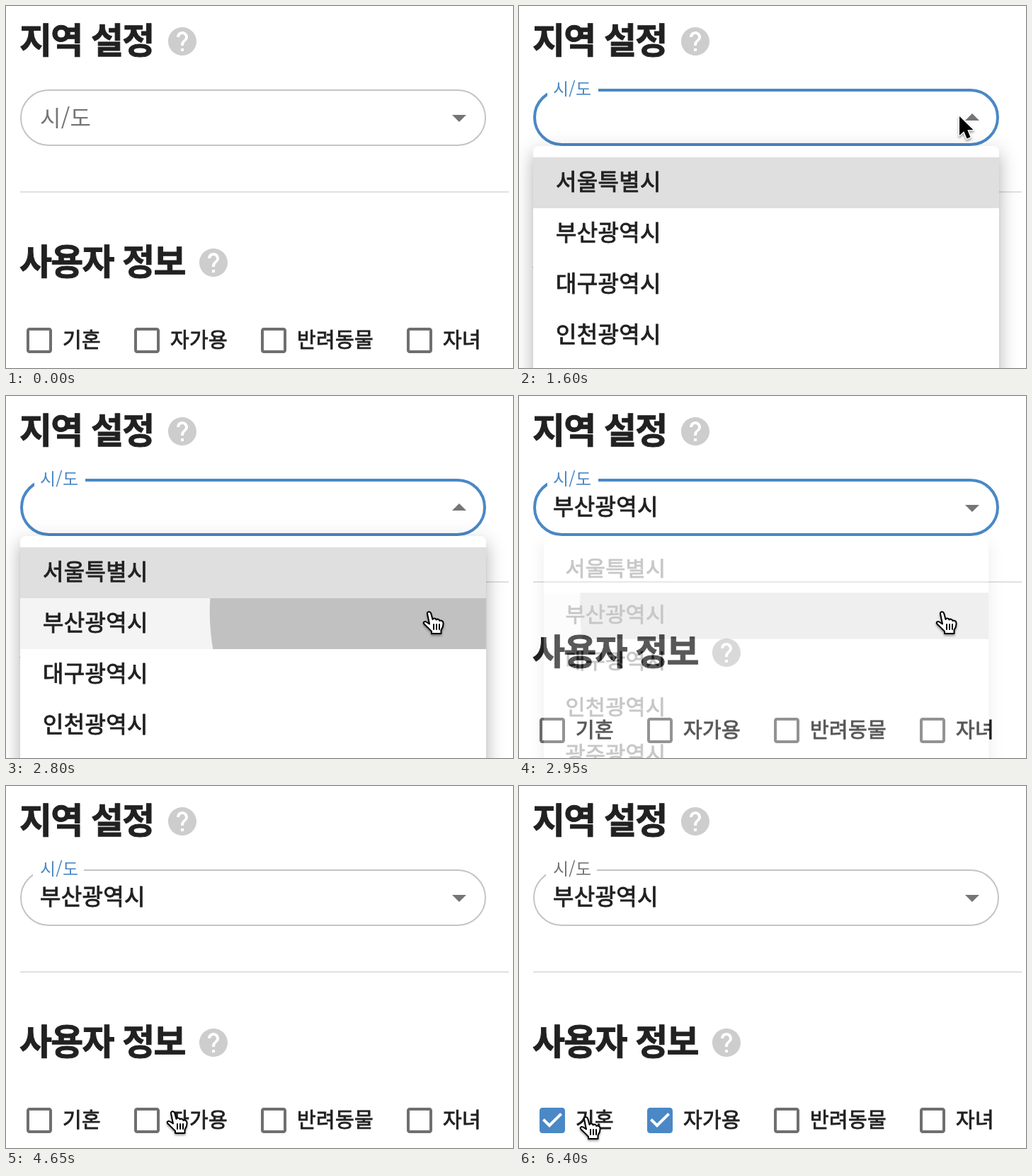
An HTML page that plays this animation: 716 by 512 pixels, repeating every 6.5 s.

```html
<!DOCTYPE html>
<html lang="ko">
<head>
<meta charset="utf-8">
<title>지역 설정</title>
<style>
html, body { margin: 0; width: 100%; height: 100%; overflow: hidden; background: #fff; }
svg { display: block; width: 716px; height: 512px; cursor: default; }
text {
  font: 500 32px "Noto Sans CJK KR", "Noto Sans KR", "Noto Sans CJK", sans-serif;
  fill: #212121; stroke: #212121; stroke-width: .9px; letter-spacing: .3px;
}
text.title { font-size: 50px; font-weight: 700; letter-spacing: -1.7px; }
text.option { font-size: 29px; }
#label { font-weight: 400; stroke: none; }
#cursor { filter: drop-shadow(0 2px 1.5px rgba(0, 0, 0, .4)); }
</style>
</head>
<body>
<svg viewBox="0 0 716 512">
  <defs>
    <path id="help" d="M12 2C6.48 2 2 6.48 2 12s4.48 10 10 10 10-4.48 10-10S17.52 2 12 2zm1 17h-2v-2h2v2zm2.07-7.75l-.9.92C13.45 12.9 13 13.5 13 15h-2v-.5c0-1.1.45-2.1 1.17-2.83l1.24-1.26c.37-.36.59-.86.59-1.41 0-1.1-.9-2-2-2s-2 .9-2 2H8c0-2.21 1.79-4 4-4s4 1.79 4 4c0 .88-.36 1.68-.93 2.25z"/>
    <filter id="blur5" x="-20%" width="140%"><feGaussianBlur stdDeviation="5"/></filter>
    <filter id="blur10" x="-20%" width="140%"><feGaussianBlur stdDeviation="10"/></filter>
    <filter id="blur14" x="-20%" width="140%"><feGaussianBlur stdDeviation="14"/></filter>
    <clipPath id="row"><rect x="20" y="286" width="658" height="72"/></clipPath>
  </defs>

  <text class="title" x="19" y="67">지역 설정</text>
  <use href="#help" transform="translate(225 26) scale(2)" fill="#cdcdcd"/>
  <rect id="border" fill="none"/>
  <rect id="notch" y="115" height="14" fill="#fff"/>
  <text id="label">시/도</text>
  <text id="value" x="48" y="168">부산광역시</text>
  <path id="arrow" fill="#757575"/>
  <rect x="20" y="262" width="690" height="2" fill="#e0e0e0"/>
  <text class="title" x="19" y="380">사용자 정보</text>
  <use href="#help" transform="translate(269 339) scale(2)" fill="#cdcdcd"/>
  <g id="options"></g>

  <g id="menu">
    <rect x="26" y="214" width="646" height="1288" opacity=".2" filter="url(#blur5)"/>
    <rect x="18" y="212" width="662" height="1304" rx="8" opacity=".14" filter="url(#blur10)"/>
    <rect x="16" y="200" width="666" height="1308" rx="8" opacity=".12" filter="url(#blur14)"/>
    <rect x="20" y="198" width="658" height="1300" rx="8" fill="#fff"/>
    <rect id="focused" x="20" y="214" width="658" height="72" opacity=".125"/>
    <rect id="hovered" x="20" y="286" width="658" height="72"/>
    <g clip-path="url(#row)"><circle id="ripple" cx="597" cy="305"/></g>
    <g id="items"></g>
  </g>

  <g id="cursor" stroke-linejoin="round">
    <path id="pointer" fill="#000" stroke="#fff" stroke-width="3" paint-order="stroke"
      d="M0 0V27L6.3 21.2 10.5 31.5 15.5 29.4 11.3 19.2H19.5Z"/>
    <g id="hand" transform="translate(-9 -1)" stroke="#000" stroke-width="2" stroke-linecap="round">
      <path fill="#fff" d="M7 4C6.5 1 11 0 12.2 3.5L14.5 12C15 10 19 10 19.5 12.5 20.5 11 24 11.5 24.3 14 26 13 29.5 14 29.5 17 30 22 28.5 24 26.5 27V32H13V29C10.5 26 6 22 2.5 18.5 .5 16 3 14 5.5 15.5L10 18.5Z"/>
      <path d="M16 19V26M20 19V26M24 19V26"/>
    </g>
  </g>
</svg>
<script>
const LOOP = 6500, STEP = 50, BLUE = [74, 136, 198], GREY = [117, 117, 117];
const OPEN = 1310, CLOSE = 2805, FADE = 300, PRESS = 2600, BLUR = 4650;

const $ = id => document.getElementById(id);
const set = (id, attrs) => { for (const k in attrs) $(id).setAttribute(k, attrs[k]); };
const show = (id, on) => set(id, { visibility: on ? 'visible' : 'hidden' });
const ramp = (t, start, length) => Math.min(1, Math.max(0, (t - start) / length));
const mix = (a, b, p) => a + (b - a) * p;
const rgb = (a, b, p) => `rgb(${a.map((v, i) => Math.round(mix(v, b[i], p)))})`;

// cubic-bezier(a, 0, .2, 1)
const bezier = a => x => {
  let lo = 0, hi = 1;
  for (let i = 0; i < 24; i++) {
    const s = (lo + hi) / 2, r = 1 - s;
    if (3 * a * s * r * r + .6 * s * s * r + s * s * s < x) lo = s; else hi = s;
  }
  return lo * lo * (3 - 2 * lo);
};
const inOut = bezier(.4), out = bezier(0);

// Cursor hot spot: time, x, y
const path = [
  [500, 740, 270], [550, 704, 240], [700, 654, 190], [800, 633, 168], [900, 622, 156],
  [1850, 622, 156], [2000, 617, 176], [2350, 602, 278], [2550, 597, 305],
  [3200, 597, 305], [3350, 545, 322], [3700, 378, 386], [3900, 279, 435],
  [4050, 250, 452], [4400, 235, 460], [4900, 235, 460],
  [5100, 205, 462], [5400, 142, 464], [5600, 108, 466], [5700, 94, 468], [LOOP, 94, 468]
];
function cursorAt(t) {
  const i = Math.max(1, path.findIndex(p => p[0] >= t));
  const [a, b] = [path[i - 1], path[i]], p = ramp(t, a[0], b[0] - a[0]);
  return [mix(a[1], b[1], p), mix(a[2], b[2], p)];
}

const boxOff = 'M19 5v14H5V5h14m0-2H5c-1.1 0-2 .9-2 2v14c0 1.1.9 2 2 2h14c1.1 0 2-.9 2-2V5c0-1.1-.9-2-2-2z';
const boxOn = 'M19 3H5c-1.11 0-2 .9-2 2v14c0 1.1.89 2 2 2h14c1.11 0 2-.9 2-2V5c0-1.1-.89-2-2-2zm-9 14l-5-5 1.41-1.41L10 14.17l7.59-7.59L19 8l-9 9z';
const options = [['기혼', 23, 5800], ['자가용', 175, 4750], ['반려동물', 354, LOOP], ['자녀', 560, LOOP]];
$('options').innerHTML = options.map(([name, x], i) =>
  `<path id="box${i}" transform="translate(${x} 449) scale(2)"/><text class="option" x="${x + 57}" y="483">${name}</text>`).join('');
$('items').innerHTML = '서울특별시 부산광역시 대구광역시 인천광역시 광주광역시 대전광역시 울산광역시 세종특별자치시 경기도'
  .split(' ').map((name, i) => `<text x="52" y="${260 + 72 * i}">${name}</text>`).join('');

function draw(t) {
  const [x, y] = cursorAt(t);
  const open = t > OPEN && t < CLOSE, focus = t > OPEN && t < BLUR;
  const overSelect = x < 678 && y > 118 && y < 198;

  // Select field
  const hover = overSelect && t < OPEN;
  set('border', focus
    ? { x: 22, y: 119, width: 654, height: 77, rx: 38.5, 'stroke-width': 4, stroke: rgb(BLUE, BLUE, 0) }
    : { x: 21, y: 119, width: 656, height: 78, rx: 39, 'stroke-width': 2, stroke: hover ? '#212121' : '#c4c4c4' });
  set('notch', { x: focus ? 40 : 38, width: 72 * out(ramp(t, 1350, 100)) });
  const shrink = out(ramp(t, 1298, 200));
  set('label', { transform: `translate(48 ${mix(170, 126, shrink)}) scale(${mix(1, .75, shrink)})` });
  $('label').style.fill = rgb(GREY, BLUE, shrink - out(ramp(t, BLUR, 200)));
  show('value', t > CLOSE);
  set('arrow', { d: open ? 'M630 162h20l-10-10z' : 'M630 154h20l-10 10z' });

  // Menu grows in, then fades before it shrinks
  const enter = ramp(t, OPEN, FADE), leave = ramp(t, CLOSE, FADE);
  const size = .75 + .25 * (inOut(Math.min(1, enter * 1.5)) - inOut(ramp(leave, 1 / 3, 2 / 3)));
  show('menu', enter > 0 && leave < 1);
  set('menu', {
    opacity: inOut(enter) - inOut(leave),
    transform: `translate(349 198) scale(${size} ${size * size}) translate(-349 -198)`
  });
  set('focused', { opacity: t < CLOSE ? .125 : 0 });
  set('hovered', { opacity: .043 * ramp(t, 2390, 150) });
  const spread = inOut(ramp(t, PRESS, 550));
  set('ripple', {
    r: 580 * spread,
    opacity: t > PRESS ? (.1 + .2 * spread) * (1 - inOut(ramp(t, CLOSE, 550))) : 0
  });

  options.forEach(([, , checkedAt], i) => {
    const on = t >= checkedAt;
    set('box' + i, { d: on ? boxOn : boxOff, fill: on ? rgb(BLUE, BLUE, 0) : '#6f6f6f' });
  });

  // Cursor
  const overMenu = t > OPEN && t < 3225 && y > 198;
  const overOption = y > 431 && ((x > 163 && x < 313) || x < 134);
  const hand = hover || overMenu || overOption;
  set('cursor', { transform: `translate(${x} ${y})` });
  show('cursor', t >= 550);
  set('hand', { display: hand ? 'inline' : 'none' });
  set('pointer', { display: hand ? 'none' : 'inline' });
}

const start = performance.now();
function frame() {
  const t = (performance.now() - start) % LOOP;
  draw(Math.floor(t / STEP) * STEP);
  requestAnimationFrame(frame);
}
frame();
</script>
</body>
</html>
```
